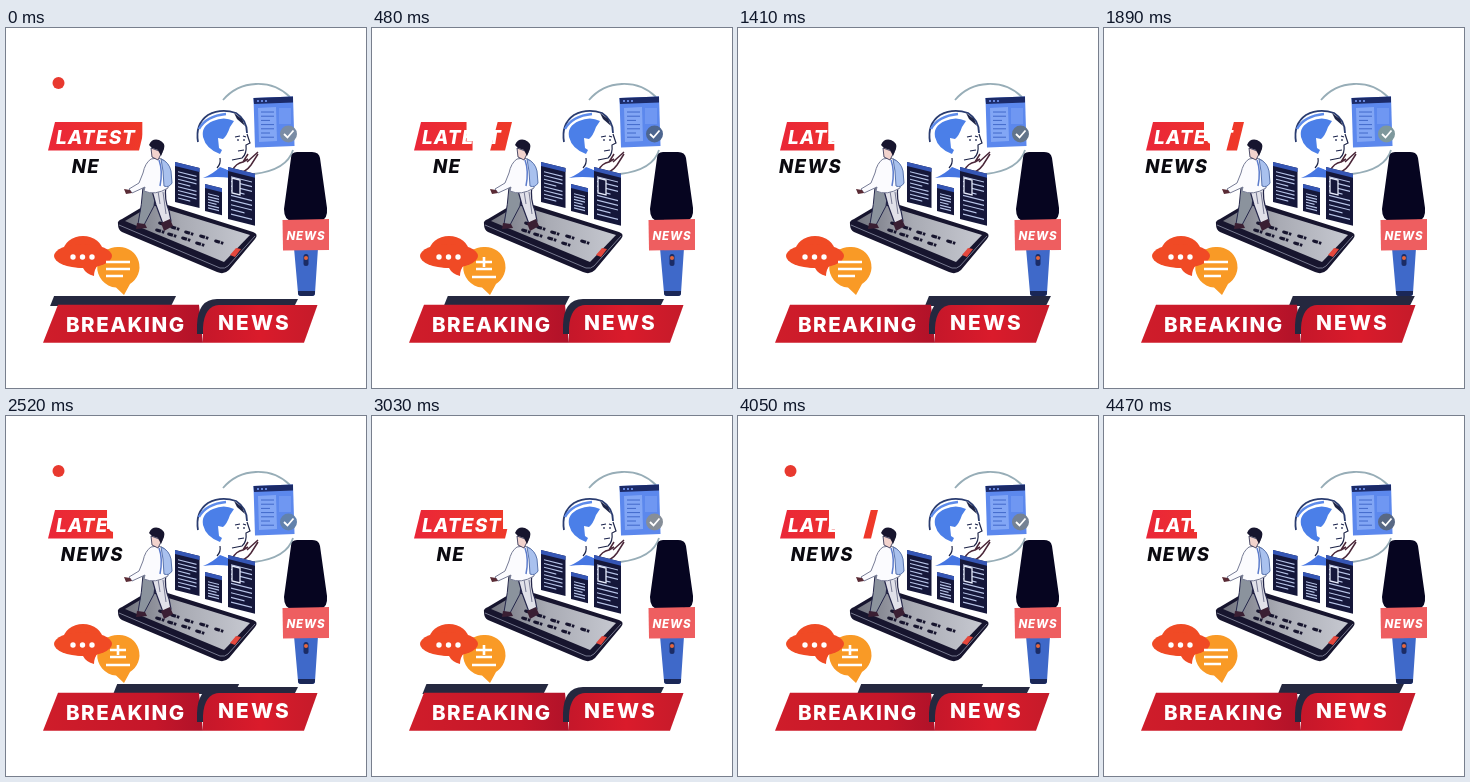
Write an HTML page that moves like this. It is 360 by 360 pixels and loops after 4.5 s.

```html
<!DOCTYPE html>
<html lang="en">
<head>
<meta charset="utf-8">
<title>Breaking news</title>
<style>
html, body { margin: 0; width: 100%; height: 100%; overflow: hidden; background: #fff; }
svg { display: block; width: 100vw; height: 100vh; }
text { font-family: Inter, "Open Sans", sans-serif; font-weight: 800; }
.slant { font-style: italic; }
</style>
</head>
<body>
<svg viewBox="0 0 360 360" xmlns="http://www.w3.org/2000/svg">
  <defs>
    <linearGradient id="tag"><stop offset="0" stop-color="#ea2638"/><stop offset="1" stop-color="#ef3a28"/></linearGradient>
    <linearGradient id="left"><stop offset="0" stop-color="#cf1d2a"/><stop offset=".7" stop-color="#c5162a"/><stop offset="1" stop-color="#b01229"/></linearGradient>
    <linearGradient id="right"><stop offset="0" stop-color="#c5172a"/><stop offset=".5" stop-color="#da1b2b"/><stop offset="1" stop-color="#c51b2a"/></linearGradient>
    <linearGradient id="screen"><stop offset="0" stop-color="#72747f"/><stop offset=".45" stop-color="#a9abb4"/><stop offset="1" stop-color="#c6c8d0"/></linearGradient>
  </defs>

  <circle id="dot" cx="52.5" cy="55" r="6" fill="#e8392f"/>

  <path d="M49 94H140L133 122.500H42Z" fill="url(#tag)"/>
  <path id="gap" fill="#fff"/>
  <text class="slant" x="50" y="115.500" font-size="19" letter-spacing="1.100" fill="#fff">LATEST</text>
  <text class="slant" id="news" y="144.500" font-size="18.500" letter-spacing="1.500" fill="#0b0a10"></text>

  <!-- thinker -->
  <g fill="none" stroke="#97adb7" stroke-width="1.8">
    <path d="M217 72A46 46 0 0 1 284 69"/>
    <path d="M287 122Q281 142 248 146"/>
  </g>
  <path d="M197 150Q207 146 214 139L222 142 225 150Q210 148 197 150Z" fill="#4676e2"/>
  <path d="M208 112Q210 98 222 94L234 92Q241 99 241 108L244 115 240 117Q241 126 236 130L226 132 224 143 214 138Q216 127 207 121Z" fill="#fff"/>
  <path d="M241 106L244 115 240 117Q241 126 236 130L226 132M214 130Q215 136 211 140" fill="none" stroke="#1d2447" stroke-width="1.200"/>
  <path d="M197 109Q195 98 207 93 218 88 228 93L224 99Q221 108 217 111L212 110 213 120 216 122 214 126Q200 121 197 109Z" fill="#4b7fe8"/>
  <path d="M192 114Q189 96 202 87 215 80 230 85 241 92 241 105" fill="none" stroke="#2a3c70" stroke-width="1.800"/>
  <path d="M193 101Q200 88 220 86" fill="none" stroke="#5d8bea" stroke-width="2.500"/>
  <path d="M228 85L236 91 239 98 231 91Z" fill="#1d2447"/>
  <path d="M229 109l5-1M237 108l3 1M232 111v2M238 111v2M232 123l6-1" fill="none" stroke="#18204a" stroke-width="1.200"/>
  <path d="M226 143Q230 135 237 134L242 126M241 134L252 124M252 126L245 137Q240 144 231 146M237 134L242 131" fill="none" stroke="#4a2638" stroke-width="1.500"/>

  <!-- browser -->
  <path d="M247.500 70L287 68.500 288.500 118 249 119.500Z" fill="#5c88ed"/>
  <path d="M247.500 70L287 68.500 287 74.500 248 76Z" fill="#1b2a68"/>
  <path d="M252 80L270 79 271 113 253 114Z" fill="#82a6f5"/>
  <path d="M273 80H285V96H273Z" fill="#6f97f2"/>
  <path d="M251 73h2m2 0h2m2 0h2" stroke="#7ea2ff" stroke-width="1.400"/>
  <path id="rows" fill="none" stroke="#4168ca" stroke-width="1"/>
  <circle id="badge" cx="282.500" cy="106" r="8.500"/>
  <path d="M278 106l3.500 3.500 6-7" fill="none" stroke="#fff" stroke-width="1.800"/>

  <!-- phone -->
  <path d="M112 196Q111 193 116 191L143 175Q147 173 152 174L247 204Q253 206 249 211L223 242Q218 247 211 244L116 204Q112 202 112 196Z" fill="#17152e"/>
  <path d="M113 197L214 240Q219 241 222 238L249 208" fill="none" stroke="#777a90" stroke-width="1"/>
  <path d="M119 193L146 177 244 207 218 234Z" fill="url(#screen)"/>
  <path d="M224 227L230 220 235 221 229 229Z" fill="#e5473c"/>
  <g id="steps" fill="#17152e"></g>

  <g id="panels"></g>

  <!-- walker -->
  <path d="M137 159L150 161 148 178 138 197 132 196Q136 176 137 159Z" fill="#8b939d" stroke="#24264a" stroke-width="1"/>
  <path d="M145 159L160 158Q158 171 163 183L165 193 157 196 150 177Z" fill="#e1e1e9" stroke="#24264a" stroke-width="1.200"/>
  <path d="M152 163L154 176M157 164L160 186" fill="none" stroke="#777a94" stroke-width="1"/>
  <path d="M131 195L139 196 141 200 130 201ZM155 195L164 191 167 198 158 203Z" fill="#3a1f33"/>
  <path d="M145 131Q139 135 137 145L133 155 123 161 126 165 139 159 138 163Q149 168 162 160L163 140Q160 131 152 130Z" fill="#fbfbfe" stroke="#767b95" stroke-width="1"/>
  <path d="M155 131Q163 134 165 143L166 155Q163 160 158 158L157 143Z" fill="#a9c1ee" stroke="#5873ad" stroke-width="1"/>
  <path d="M153 132Q157 143 154 158" fill="none" stroke="#5c7ccc" stroke-width="1.500"/>
  <path d="M118 161L124 162 126 165 120 166Z" fill="#5a2b35"/>
  <path d="M145 120L146 129 152 132 156 124Z" fill="#f2d3cd" stroke="#24264a" stroke-width=".8"/>
  <path d="M143 117Q146 110 153 112 160 115 158 121L155 128 152 122 146 120Z" fill="#17152e"/>

  <!-- microphone -->
  <path d="M285 130Q285 124 291 124H306Q313 124 314 130L321 180Q322 192 314 193H286Q278 192 278 181Z" fill="#060520"/>
  <path d="M288 220H312L309 265Q309 268 306 268H295Q292 268 292 265Z" fill="#3f69c9"/>
  <path d="M292 263H309V265Q309 268 306 268H295Q292 268 292 265Z" fill="#1a2757"/>
  <rect x="297.500" y="226" width="5" height="12" rx="2.500" fill="#1b2c66"/>
  <circle cx="300" cy="230" r="2" fill="#e3663e"/>
  <path d="M276.500 192L323 191V222L277 222.500Z" fill="#ee5e60"/>
  <text class="slant" x="280.500" y="211.500" font-size="11.500" letter-spacing=".8" fill="#fff">NEWS</text>

  <!-- chat -->
  <path d="M113 219A20 20 0 0 1 124 256L118 267 110 259.500A20 20 0 0 1 113 219Z" fill="#f99a26"/>
  <g fill="#f04a25">
    <ellipse cx="77" cy="224" rx="20" ry="16"/>
    <ellipse cx="77" cy="228" rx="29" ry="12"/>
    <path d="M70 236H93Q88 241 88 248 80 246 77 240Z"/>
  </g>
  <g fill="#fff"><circle cx="67" cy="229" r="2.700"/><circle cx="76.500" cy="229" r="2.700"/><circle cx="86" cy="229" r="2.700"/></g>
  <path id="lines" fill="none" stroke="#fff" stroke-width="2.600"/>

  <!-- ribbons -->
  <path id="bar" d="M4 268H126L121 278H0Z" fill="#25283f"/>
  <path d="M52 276.700H193L197 314.700H37Z" fill="url(#left)"/>
  <path d="M191 306V297Q192 271 211 271H292L288 279H212L199 306Z" fill="#25283f"/>
  <path d="M213 277H311.500L298 314.700H197V300Q198 278 213 277Z" fill="url(#right)"/>
  <text x="60" y="304.300" font-size="20.500" letter-spacing="1.500" fill="#fff">BREAKING</text>
  <text x="212" y="302.300" font-size="20.800" letter-spacing="2.200" fill="#fff">NEWS</text>
</svg>
<script>
const $ = id => document.getElementById(id);
const LOOP = 4500, SWING = 3220, LOW = 3245;

const range = n => [...Array(n).keys()];

$('rows').setAttribute('d', range(7).map(i => `M255 ${84 + i * 4.2}h${i % 3 === 2 ? 9 : 13}`).join(''));

$('steps').innerHTML = [[157, 196], [169, 200], [183, 205], [198, 209], [213, 214],
  [154, 203], [166, 207], [180, 211], [194, 216]]
  .map(([x, y]) => `<path transform="translate(${x} ${y}) rotate(18)" d="M-5 0Q-5-2-1-1.600H1V1.600H-2Q-5 2-5 0ZM2-1.500H4.500V1.500H2Z"/>`).join('');

function panel(x, y, w, h, n) {
  const gap = (h - 10) / n;
  const rows = range(n).map(i => `M3 ${9 + i * gap}h${i % 4 === 3 ? w * .5 : w - 6}`).join('');
  return `<g transform="translate(${x} ${y}) skewY(14)">
    <rect width="${w}" height="${h}" fill="#15173a"/><rect width="${w}" height="4" fill="#3556b5"/>
    <path d="${rows}" stroke="#b9c6ea" stroke-width="1.200"/></g>`;
}
$('panels').innerHTML = panel(169, 134, 24.5, 40, 8) + panel(199, 156, 17, 27, 6) + panel(222, 139, 27, 52, 9) +
  '<path d="M226 150L234 152V167L226 165Z" fill="#15173a" stroke="#e6ebfb" stroke-width="1.300"/>';

// phase in degrees, then left and right edge of the opening in the tag
const gapKeys = [[0, 140, 140], [46, 98, 121], [101, 93, 131], [137, 90, 142],
  [208, 103, 126], [279, 104, 141], [336, 134, 140], [360, 140, 140]];
// phase, then red, green and blue
const badgeKeys = [[0, 120, 140, 165], [46, 72, 98, 142], [101, 128, 138, 150], [137, 88, 104, 132],
  [208, 126, 152, 156], [279, 98, 130, 172], [336, 134, 142, 152], [360, 120, 140, 165]];

function mix(keys, p) {
  const i = keys.findIndex((k, n) => n && k[0] >= p);
  const a = keys[i - 1], b = keys[i], u = (p - a[0]) / (b[0] - a[0]);
  return a.slice(1).map((v, n) => v + (b[n + 1] - v) * u);
}

function draw(t) {
  const phase = ((t - LOW) / SWING % 1 + 1) % 1 * 360;
  const c = Math.cos(phase * Math.PI / 180);

  $('bar').setAttribute('transform', `translate(${119 - 75 * c} 0)`);

  const x = 53 + 13 * c;
  $('news').setAttribute('x', x - .3);
  $('news').textContent = x > 57 ? 'NE' : 'NEWS';

  const [l, r] = mix(gapKeys, phase);
  $('gap').setAttribute('d', r - l < .5 ? '' : `M${l - 3} 93H${r + 4}L${r - 4} 123.5H${l + 3}V113H${l - 3}Z`);

  $('dot').style.display = (t + 160) / 805 % 1 < .5 ? '' : 'none';

  $('badge').setAttribute('fill', `rgb(${mix(badgeKeys, phase).map(Math.round)})`);

  const icon = phase > 20 && phase < 120 || phase > 245 && phase < 347;
  $('lines').setAttribute('d', icon
    ? 'M104 234h16M112 229v10M104 241h16M100 249h24'
    : 'M100 234h24M100 241h24M100 248h17');
}

const start = performance.now();
function tick() {
  draw((performance.now() - start) % LOOP);
  requestAnimationFrame(tick);
}
draw(0);
requestAnimationFrame(tick);
</script>
</body>
</html>
```
